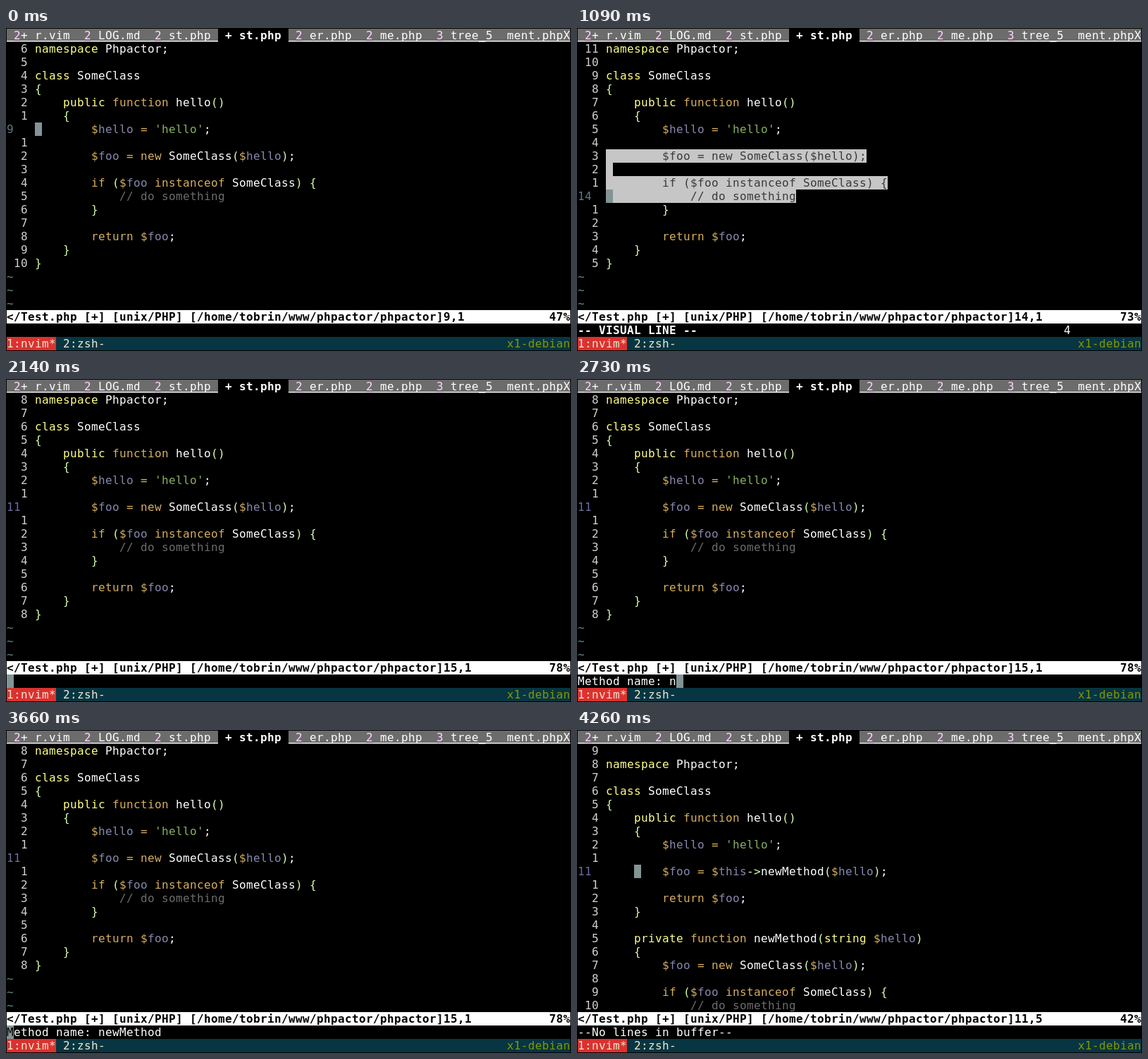
An HTML page for the animation above (4870 ms loop, 802 by 458 pixels).

```html
<!DOCTYPE html>
<html lang="en">
<head>
<meta charset="utf-8">
<title>Extract method</title>
<style>
  html, body { margin: 0; width: 100%; height: 100%; overflow: hidden; background: #000; }
  #screen {
    position: relative; width: 802px; height: 458px; overflow: hidden;
    font: 16px/19px "DejaVu Sans Mono", monospace;
    letter-spacing: calc(10px - 1ch);
    color: #fff;
  }
  .row, #caret { position: absolute; height: 19px; white-space: pre; }
  .row { left: 1px; width: 800px; }
  .row span { display: inline-block; height: 19px; vertical-align: top; }
  #caret { width: 10px; background: #839496; color: #000; }

  .tab, .count { background: #6c6c6c; text-decoration: underline 1px; text-underline-offset: 2px; text-decoration-skip-ink: none; }
  .count { color: #ffd7ff; }
  .bold { font-weight: bold; }
  .status { background: #fff; color: #000; font-weight: bold; }
  .tmux { background: #073642; color: #eee8d5; }
  .window { background: #dc322f; }
  .host { color: #859900; }

  .number { color: #d0d0d0; }
  .here { color: #5f7b85; }
  .here.start { color: #6c6ca4; }
  .tilde { color: #5f8787; }
  .note { color: #6c6c6c; }
  .string { color: #87af5f; }
  .word { color: #d7af5f; }
  .name { color: #8787af; }
  .type { color: #ffff87; }
  .mark { color: #d7ffaf; }
  .selected { background: #c6c6c6; color: #3a3a3a; }
</style>
</head>
<body>
<div id="screen"></div>
<script>
const LOOP = 4870, ROWS = 24, FIRST_ROW = 1, LAST_ROW = 20;
const STATUS_ROW = 21, COMMAND_ROW = 22, TMUX_ROW = 23;
const START = 11;

const head = `<?php

namespace Phpactor;

class SomeClass
{
    public function hello()
    {
        $hello = 'hello';
`;
const body = `
        $foo = new SomeClass($hello);

        if ($foo instanceof SomeClass) {
            // do something
        }
`;
const tail = `
        return $foo;
    }
`;
const before = { top: 3, lines: (head + body + tail + '}').split('\n') };
const after = {
  top: 2,
  lines: (head + `
        $foo = $this->newMethod($hello);
` + tail + `
    private function newMethod(string $hello)
    {` + body + tail + '}').split('\n')
};

// Each step changes part of the editor state.
const typing = [2320, 2730, 2820, 2870, 3050, 3160, 3310, 3350, 3430, 3520];
const steps = [
  [0, { view: before, line: 9, shown: 9, col: 1, visual: false, message: '', keys: '', caret: null }],
  [390, { line: 10, shown: 10 }],
  [510, { line: 11, shown: 11 }],
  [710, { visual: true, message: '-- VISUAL LINE --', keys: '1' }],
  ...[830, 960, 1090, 1240].map((time, i) =>
    [time, { line: 12 + i, shown: 12 + i, keys: String(2 + i) }]),
  [1810, { keys: ',' }],
  [1950, { keys: '5,e' }],
  [2140, { line: START, visual: false, message: '', keys: '', caret: [COMMAND_ROW, 0] }],
  ...typing.map((time, i) =>
    [time, { message: 'Method name: ' + 'newMethod'.slice(0, i), caret: [COMMAND_ROW, 13 + i] }]),
  [3660, { caret: [COMMAND_ROW, 0] }],
  [3900, { message: '--No lines in buffer--', caret: [FIRST_ROW, 0] }],
  [3940, { view: after, shown: START, col: 5, caret: null }],
  [3980, { caret: [FIRST_ROW, 0] }],
  [4260, { caret: null }]
];
let last = {};
const states = steps.map(([time, change]) => last = { ...last, ...change, time });

const screen = document.getElementById('screen');
const addDiv = () => screen.appendChild(document.createElement('div'));
const rows = Array.from({ length: ROWS }, (_, r) => {
  const row = addDiv();
  row.className = 'row';
  row.style.top = 1 + 19 * r + 'px';
  return row;
});
const caret = addDiv();
caret.id = 'caret';

function span(text, className = '') {
  const el = document.createElement('span');
  el.className = className;
  el.textContent = text;
  return el;
}

const write = (row, ...parts) => rows[row].replaceChildren(...parts);

const syntax = /(?<note>\/\/.*)|(?<string>'.*?')|(?<name>(?<=\$)\w+)|(?<word>[$=]|\b(?:function|new|if|instanceof|return)\b)|(?<type>\b(?:namespace|class|public|private|string)\b)|(?<mark>->|[(){}])/g;

function highlight(code) {
  const parts = [];
  let end = 0;
  for (const match of code.matchAll(syntax)) {
    const kind = Object.keys(match.groups).find(key => match.groups[key]);
    parts.push(span(code.slice(end, match.index)), span(match[0], kind));
    end = match.index + match[0].length;
  }
  return [...parts, span(code.slice(end))];
}

function gutter(number, line) {
  if (number === line) {
    return span(String(number).padEnd(4), number === START ? 'here start' : 'here');
  }
  return span(String(Math.abs(number - line)).padStart(3) + ' ', 'number');
}

const tabs = text => text.split(/(\d(?=\+? ))/).map((part, i) => span(part, i % 2 ? 'count' : 'tab'));

function drawFrame() {
  write(0,
    ...tabs(' 2+ r.vim  2 LOG.md  2 st.php '),
    span(' + st.php ', 'bold'),
    ...tabs(' 2 er.php  2 me.php  '), span('3', 'count'), span(' tree_5  ment.phpX', 'tab'));
  rows[STATUS_ROW].classList.add('status');
  rows[TMUX_ROW].classList.add('tmux');
  write(TMUX_ROW, span('1:nvim*', 'window'), span(' 2:zsh-'.padEnd(64)), span('x1-debian', 'host'));
}

function draw({ view, line, shown, col, visual, message, keys, caret: place }) {
  for (let r = FIRST_ROW; r <= LAST_ROW; r++) {
    const number = view.top + r - FIRST_ROW;
    const code = view.lines[number - 1];
    if (code === undefined) {
      write(r, span('~', 'tilde'));
      continue;
    }
    const selected = visual && number >= START && number <= line;
    write(r, gutter(number, line), ...(selected ? [span(code || ' ', 'selected')] : highlight(code)));
  }
  const file = '</Test.php [+] [unix/PHP] [/home/tobrin/www/phpactor/phpactor]';
  const percent = Math.floor(100 * shown / view.lines.length) + '%';
  write(STATUS_ROW, span((file + shown + ',' + col).padEnd(77) + percent));
  write(COMMAND_ROW, span(message.padEnd(69), visual ? 'bold' : ''), span(keys));

  const [r, c] = place || [line - view.top + FIRST_ROW, 3 + col];
  caret.style.left = 1 + 10 * c + 'px';
  caret.style.top = 1 + 19 * r + 'px';
  caret.textContent = rows[r].textContent[c] || '';
}

let current;
function tick() {
  const time = performance.now() % LOOP;
  const state = states.findLast(s => s.time <= time);
  if (state !== current) draw(current = state);
  requestAnimationFrame(tick);
}

drawFrame();
tick();
</script>
</body>
</html>
```
